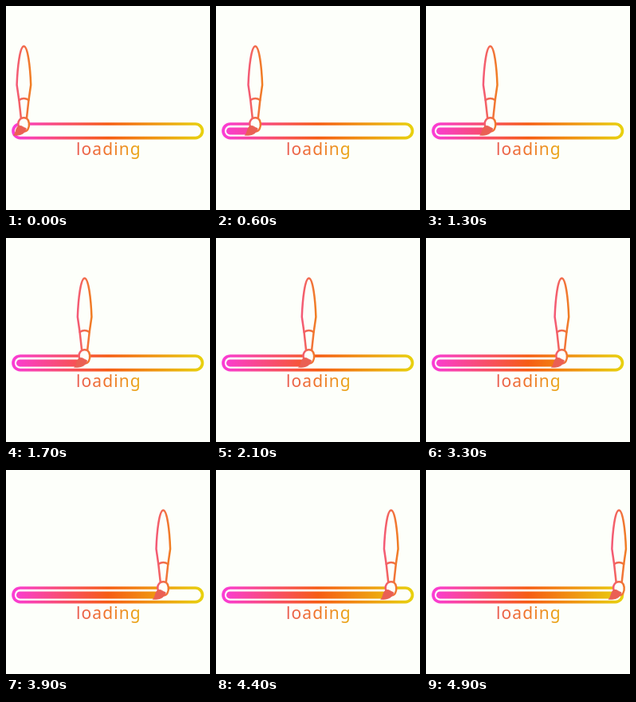
Animation of 256x256 px, one loop 5000 ms. Source, as an HTML page:

```html
<!DOCTYPE html>
<html lang="en">
<head>
<meta charset="utf-8">
<title>Loading</title>
<style>
  html, body { margin: 0; width: 100%; height: 100%; overflow: hidden; background: #fdfffa; }
  svg { display: block; width: 100vw; height: 100vh; }
  text { font: 400 21px "Noto Sans", "Open Sans", sans-serif; letter-spacing: 1.1px; }
</style>
</head>
<body>
<svg viewBox="0 0 256 256">
  <defs>
    <linearGradient id="bar" gradientUnits="userSpaceOnUse" x1="8" x2="248">
      <stop offset="0" stop-color="#fa3cd6"/>
      <stop offset=".5" stop-color="#f65c14"/>
      <stop offset="1" stop-color="#e8d20e"/>
    </linearGradient>
    <linearGradient id="word" gradientUnits="userSpaceOnUse" x1="89" x2="166">
      <stop offset="0" stop-color="#ea5c50"/>
      <stop offset=".5" stop-color="#f0752a"/>
      <stop offset="1" stop-color="#eaa71a"/>
    </linearGradient>
    <linearGradient id="wood" gradientUnits="userSpaceOnUse" x1="-10" x2="10">
      <stop offset="0" stop-color="#f4587c"/>
      <stop offset="1" stop-color="#f0801e"/>
    </linearGradient>
  </defs>

  <rect x="9" y="148" width="237.5" height="17.6" rx="8.8" fill="none" stroke="url(#bar)" stroke-width="3.7"/>
  <rect id="fill" x="13" y="152.4" height="9" rx="4.5" fill="url(#bar)"/>
  <text x="88" y="186.7" fill="url(#word)">loading</text>

  <g id="brush" fill="#fdfffa" stroke="url(#wood)" stroke-width="2.5" stroke-linejoin="round" stroke-linecap="round">
    <path d="M-3.5 141 L-6 118.5 L-8.8 99 C-8 77 -5 50.5 0 50.5 C5 50.5 8 77 8.8 99 L6 118.5 L3.5 141Z"/>
    <path d="M-6 118 Q0 113.8 6 118" fill="none"/>
    <path d="M-3.5 141 C-7 143.5 -7.7 147 -6.5 151 C-4.5 157 2.5 159.5 5.2 154.5 C7.6 150 6.8 143.5 3.5 141 Q0 139.5 -3.5 141Z"/>
    <path d="M-12.5 162 C-9.5 159 -10.3 152.5 -6.5 150.8 C-2.8 149.4 -1 152.5 2.8 153.6 C2.4 159.5 -4 163 -12.5 162Z" fill="#ea6054" stroke="#ea6054" stroke-width="1"/>
  </g>
</svg>
<script>
  const LOOP = 5000, STEP = 100;
  const brush = document.getElementById("brush");
  const fill = document.getElementById("fill");

  function draw(now) {
    const step = Math.floor((now % LOOP) / STEP);
    const x = 22.4 + 4.485 * step;
    brush.setAttribute("transform", `translate(${x} 0)`);
    fill.setAttribute("width", Math.max(0, x - 19));
  }

  const start = performance.now();
  function tick() {
    draw(performance.now() - start);
    requestAnimationFrame(tick);
  }
  tick();
</script>
</body>
</html>
```
